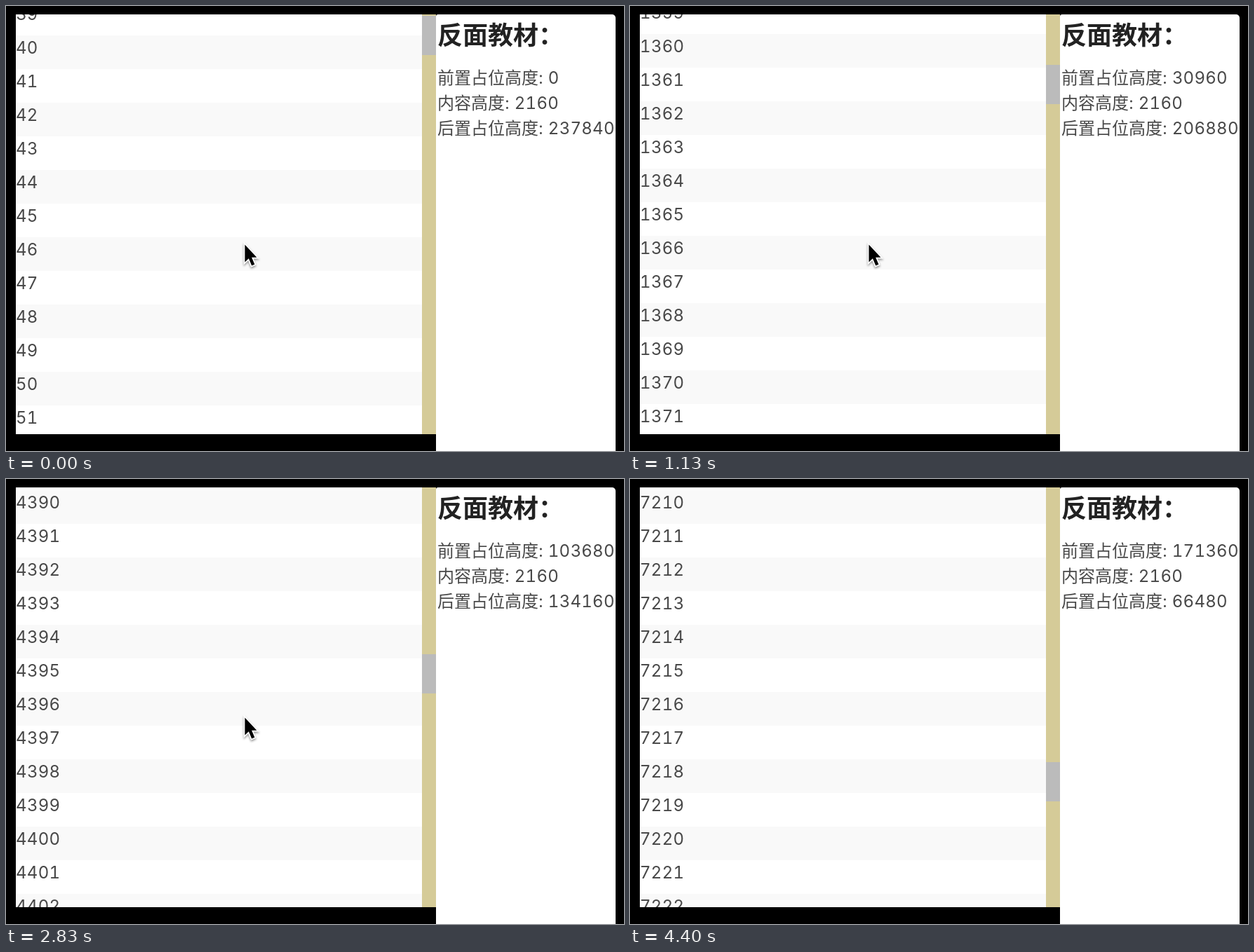
Animation, 881 px wide and 635 px high, one loop 4.43 s. Source, as an HTML page:

```html
<!DOCTYPE html>
<html lang="zh-CN">
<head>
<meta charset="utf-8">
<style>
  html, body { margin: 0; width: 100%; height: 100%; overflow: hidden; background: #000; }
  body { position: relative; color: #484848; font: 24px/36px Inter, "Noto Sans CJK SC", "Noto Sans CJK", sans-serif; }
  #list, #panel, #thumb, #cursor, .row, h1, p { position: absolute; margin: 0; }
  #list { left: 14px; top: 12px; width: 599px; height: 599px; overflow: hidden; background: #d5cb98; }
  .row { left: 0; width: 579px; height: 48px; background: #fff; }
  .row.even { background: #f9f9f9; }
  .row, span { font-variant-numeric: tabular-nums; letter-spacing: .3px; }
  #thumb { right: 0; width: 20px; height: 56px; background: #bbb; }
  #panel { left: 613px; top: 12px; width: 256px; height: 640px; background: #fff; border-radius: 3px 5px 0 0; white-space: nowrap; }
  h1 { left: 2px; top: 3px; font-size: 36px; line-height: 54px; font-weight: 700; color: #222; }
  p { left: 2px; top: 73px; }
  #cursor { left: 0; top: 0; overflow: visible; filter: drop-shadow(0 2px 1.5px #0006); }
</style>
</head>
<body>
<div id="list"><div id="thumb"></div></div>
<div id="panel">
  <h1>反面教材：</h1>
  <p>前置占位高度: <span id="before"></span><br>内容高度: <span>2160</span><br>后置占位高度: <span id="after"></span></p>
</div>
<svg id="cursor" width="20" height="34">
  <path d="M0 0V25L5.5 19.8 9.8 30 14 28.2 9.7 18.3H17Z" stroke="#fff" stroke-width="3.4" paint-order="stroke"/>
</svg>
<script>
const LOOP = 4430, ROW = 24, PAGE = 30, CONTENT = 2160, TOTAL = 240000, VIEW = 300;
const FAST = 24, SLIP = 41, LEAVE = 100;
const exitPath = [[379, 396], [506, 489], [716, 595]];
const $ = id => document.getElementById(id);

const rows = Array.from({ length: 14 }, () => {
  const row = document.createElement("div");
  $("list").insertBefore(row, $("thumb"));
  return row;
});

// Thirty steps per second on a 30/40/30 ms cadence
function stepAt(t) {
  const rest = t % 100;
  return 3 * Math.floor(t / 100) + (rest >= 30) + (rest >= 70);
}

function draw(step) {
  // One page per step at first, then two, with a single dropped page
  const page = 1 + step + Math.max(0, step - FAST) - (step >= SLIP);
  const offset = step < 20 ? 225 : step < SLIP ? 226 : 238;
  const scroll = page * PAGE * ROW + offset;
  const blank = step <= FAST && step % 2 === 1;
  const first = Math.floor(scroll / ROW);

  rows.forEach((row, i) => {
    const n = first + i;
    row.className = n % 2 ? "row" : "row even";
    row.textContent = n;
    row.style.top = 2 * (n * ROW - scroll) + "px";
    row.style.visibility = blank ? "hidden" : "visible";
  });

  $("thumb").style.top = 2 * Math.floor(scroll / (TOTAL - VIEW) * 543.5 / 2) + "px";
  const before = Math.max(0, page - 2) * PAGE * ROW;
  $("before").textContent = before;
  $("after").textContent = TOTAL - CONTENT - before;

  const [x, y] = step < LEAVE ? [340.5, 340.5] : exitPath[step - LEAVE] || [0, 700];
  $("cursor").style.transform = `translate(${x}px, ${y}px)`;
}

const start = performance.now();
function tick() {
  draw(stepAt((performance.now() - start) % LOOP));
  requestAnimationFrame(tick);
}
tick();
</script>
</body>
</html>
```
